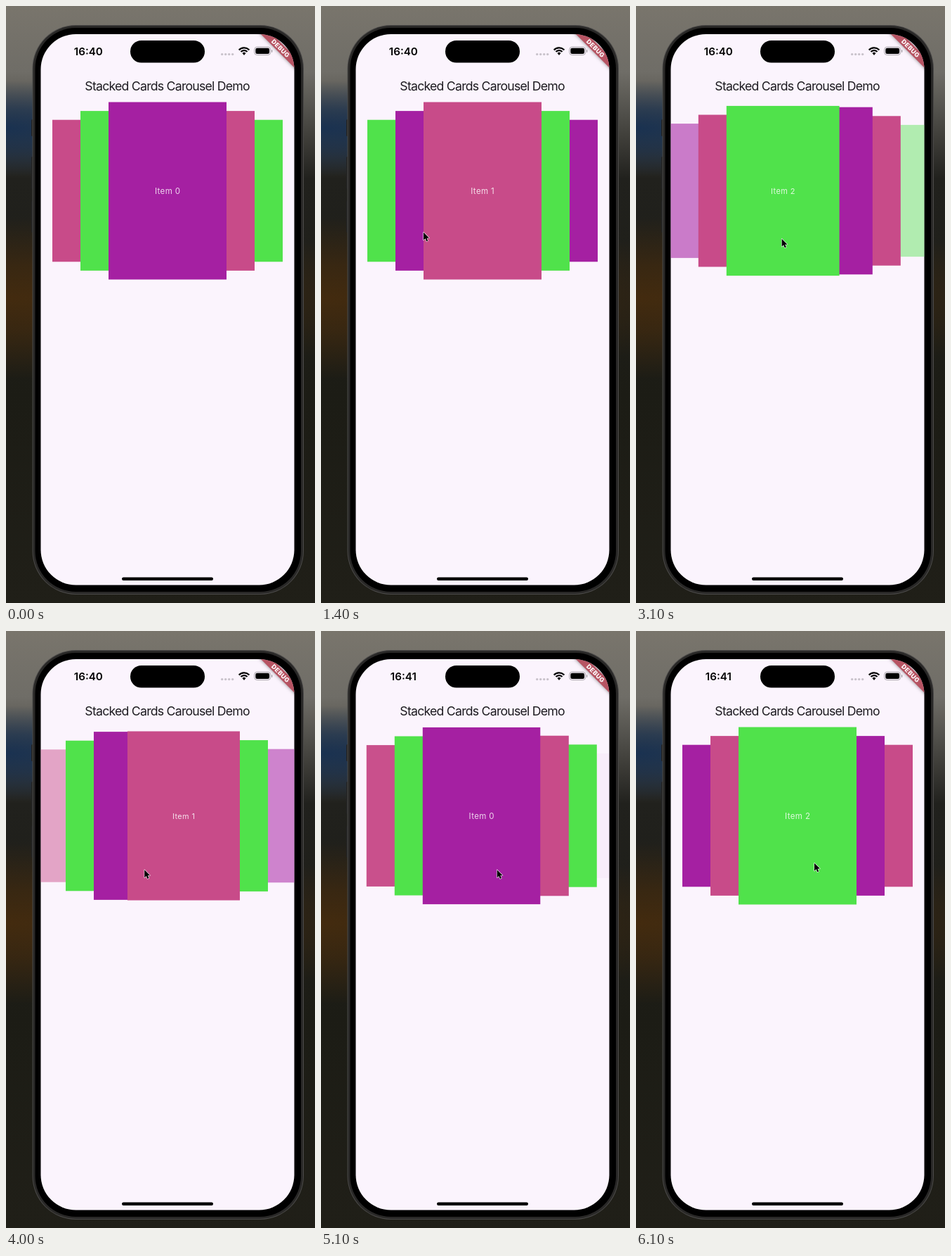
Write an HTML page with a canvas that moves like this. It is 440 px wide and 848 px high and loops after 6.2 s.

```html
<!DOCTYPE html>
<html lang="en">
<head>
<meta charset="utf-8">
<title>Stacked cards</title>
<style>
html, body { margin: 0; width: 100%; height: 100%; overflow: hidden; background: #1c1c16; }
canvas { display: block; width: 440px; height: 848px; }
</style>
</head>
<body>
<canvas id="stage" width="440" height="848"></canvas>
<script>
const ctx = document.getElementById('stage').getContext('2d');
const LOOP = 6200, STEP = 100, CLOCK_TICK = 4600, POINTER_SHOWN = 400;
const SCREEN = [49.5, 40, 361, 782.5, 50];
const CARD = { x: 230, y: 262.5, w: 168, h: 252, gap: 40 };
const COLORS = ['#a520a2', '#c84b89', '#50e24b'];
const FONT = 'Inter, "Liberation Sans", sans-serif';

// Four swipes forward, then two back.
const SWIPE_TIME = 700, SWIPE_REACH = 54;
const SWIPES = [700, 1740, 2783, 3638, 4473, 5400]
  .map((start, i) => ({ start, dir: i < 4 ? 1 : -1 }));

const ease = u => {
  u = Math.max(0, Math.min(1, u));
  return u * u * (3 - 2 * u);
};
const progress = (swipe, t) => ease((t - swipe.start) / SWIPE_TIME);
const pageAt = t => SWIPES.reduce((page, s) => page + s.dir * progress(s, t), 0);

// The pointer drags along with a swipe, then goes to where the next one begins.
function pointerAt(t) {
  const y = 331 - 10 * Math.cos((t - 1700) / 5700 * 2 * Math.PI);
  const current = SWIPES.findLast(s => s.start <= t);
  const next = SWIPES.find(s => s.start > t);
  if (!current) return { x: 200 + SWIPE_REACH * next.dir, y };
  let side = current.dir * (1 - 2 * progress(current, t));
  const end = current.start + SWIPE_TIME;
  if (next && t > end) side += (next.dir - side) * ease((t - end) / (next.start - end));
  return { x: 200 + SWIPE_REACH * side, y };
}

function rounded(x, y, w, h, r, fill) {
  ctx.beginPath();
  ctx.roundRect(x, y, w, h, r);
  if (fill) {
    ctx.fillStyle = fill;
    ctx.fill();
  }
}

function label(text, x, y, font, fill, spacing = 0) {
  ctx.font = `${font} ${FONT}`;
  ctx.letterSpacing = spacing + 'px';
  ctx.fillStyle = fill;
  ctx.textAlign = 'center';
  ctx.fillText(text, x + spacing / 2, y);
  ctx.letterSpacing = '0px';
}

// Soft ellipse of light on the left edge.
function glow(y, rx, ry, rgb) {
  ctx.save();
  ctx.translate(0, y);
  ctx.scale(rx, ry);
  const g = ctx.createRadialGradient(0, 0, 0, 0, 0, 1);
  g.addColorStop(0, `rgba(${rgb},.92)`);
  g.addColorStop(0.4, `rgba(${rgb},.65)`);
  g.addColorStop(1, `rgba(${rgb},0)`);
  ctx.fillStyle = g;
  ctx.fillRect(0, -1, 1, 2);
  ctx.restore();
}

function drawBackdrop() {
  const g = ctx.createLinearGradient(0, 0, 0, 848);
  g.addColorStop(0, '#79756c');
  g.addColorStop(0.11, '#6f6d67');
  g.addColorStop(0.29, '#21211d');
  g.addColorStop(0.65, '#1c1c15');
  g.addColorStop(1, '#201f18');
  ctx.fillStyle = g;
  ctx.fillRect(0, 0, 440, 848);
  glow(174, 300, 68, '22,48,82');
  glow(415, 620, 115, '70,44,14');
}

function drawPhone() {
  for (const [y, h] of [[161, 24], [214, 46], [276, 46]]) rounded(36, y, 4, h, 1.5, '#222');
  rounded(37.5, 27, 386.5, 809, 62, '#4b4a49');
  rounded(38.5, 28, 384.5, 807, 61, '#292827');
  rounded(41.5, 31, 378.5, 801, 58, '#000');
  rounded(...SCREEN, '#fbf4fd');
}

function drawCard(index, r) {
  const depth = Math.abs(r), scale = 1 - depth * 0.1;
  const w = CARD.w * scale, h = CARD.h * scale;
  // The outer edge advances evenly while the card shrinks.
  const x = CARD.x + Math.sign(r) * (CARD.w / 2 + CARD.gap * depth - w / 2);
  const kind = ((index % 3) + 3) % 3;
  ctx.save();
  ctx.globalAlpha = Math.max(0, Math.min(1, 3 - depth));
  ctx.translate(x, CARD.y);
  ctx.fillStyle = COLORS[kind];
  ctx.fillRect(-w / 2, -h / 2, w, h);
  ctx.scale(scale, scale);
  label('Item ' + kind, 0, 4.3, '400 11.5px', 'rgba(255,255,255,.82)', 0.4);
  ctx.restore();
}

function drawCarousel(page) {
  const cards = [];
  for (let i = Math.ceil(page - 3); i <= page + 3; i++) cards.push(i);
  cards.sort((a, b) => Math.abs(b - page) - Math.abs(a - page));
  for (const i of cards) drawCard(i, i - page);
}

function drawStatus(t) {
  label(t < CLOCK_TICK ? '16:40' : '16:41', 117.3, 70, '600 15.2px', '#000');
  rounded(177, 49, 106, 31.5, 15.7, '#000');
  for (let i = 0; i < 4; i++) rounded(306 + i * 5, 67, 3.4, 3.2, 1.6, '#c9c3cb');

  // Wi-Fi
  const arc = r => ctx.arc(339, 69.3, r, -Math.PI * 0.76, -Math.PI * 0.24);
  ctx.strokeStyle = ctx.fillStyle = '#000';
  ctx.lineWidth = 2.3;
  for (const r of [6.2, 10]) {
    ctx.beginPath();
    arc(r);
    ctx.stroke();
  }
  ctx.beginPath();
  ctx.moveTo(339, 70);
  arc(3.4);
  ctx.fill();

  // Battery
  rounded(353.7, 58.2, 23, 11.4, 3.8);
  ctx.strokeStyle = '#a9a4ab';
  ctx.lineWidth = 1;
  ctx.stroke();
  rounded(355.3, 59.7, 19.8, 8.4, 2.4, '#000');
  rounded(378, 62, 1.3, 4, 0.7, '#a9a4ab');
}

function drawBanner() {
  ctx.save();
  ctx.translate(411, 40);
  ctx.rotate(Math.PI / 4);
  ctx.shadowColor = 'rgba(0,0,0,.45)';
  ctx.shadowBlur = 5;
  ctx.fillStyle = '#b75463';
  ctx.fillRect(-50, 22.5, 100, 11.5);
  ctx.shadowColor = 'transparent';
  label('DEBUG', 0, 31.6, '800 8.8px', '#fff', 0.4);
  ctx.restore();
}

function drawPointer({ x, y }) {
  ctx.save();
  ctx.translate(x, y);
  ctx.scale(0.92, 0.92);
  const arrow = new Path2D('M0 0V12L2.8 9.5L4.6 13.8L6.7 12.9L4.9 8.8L8.6 8.6Z');
  ctx.lineJoin = 'round';
  ctx.lineWidth = 1.4;
  ctx.strokeStyle = 'rgba(255,255,255,.85)';
  ctx.stroke(arrow);
  ctx.fillStyle = '#000';
  ctx.fill(arrow);
  ctx.restore();
}

function draw(t) {
  drawBackdrop();
  drawPhone();
  ctx.save();
  rounded(...SCREEN);
  ctx.clip();
  drawStatus(t);
  label('Stacked Cards Carousel Demo', 230, 120, '400 17.7px', '#1d1b20', -0.77);
  drawCarousel(pageAt(t));
  drawBanner();
  rounded(165, 811.5, 130, 4.5, 2.2, '#000');
  ctx.restore();
  if (t >= POINTER_SHOWN) drawPointer(pointerAt(t));
}

const start = performance.now();
function tick() {
  const t = (performance.now() - start) % LOOP;
  draw(Math.floor(t / STEP) * STEP);
  requestAnimationFrame(tick);
}
tick();
</script>
</body>
</html>
```
